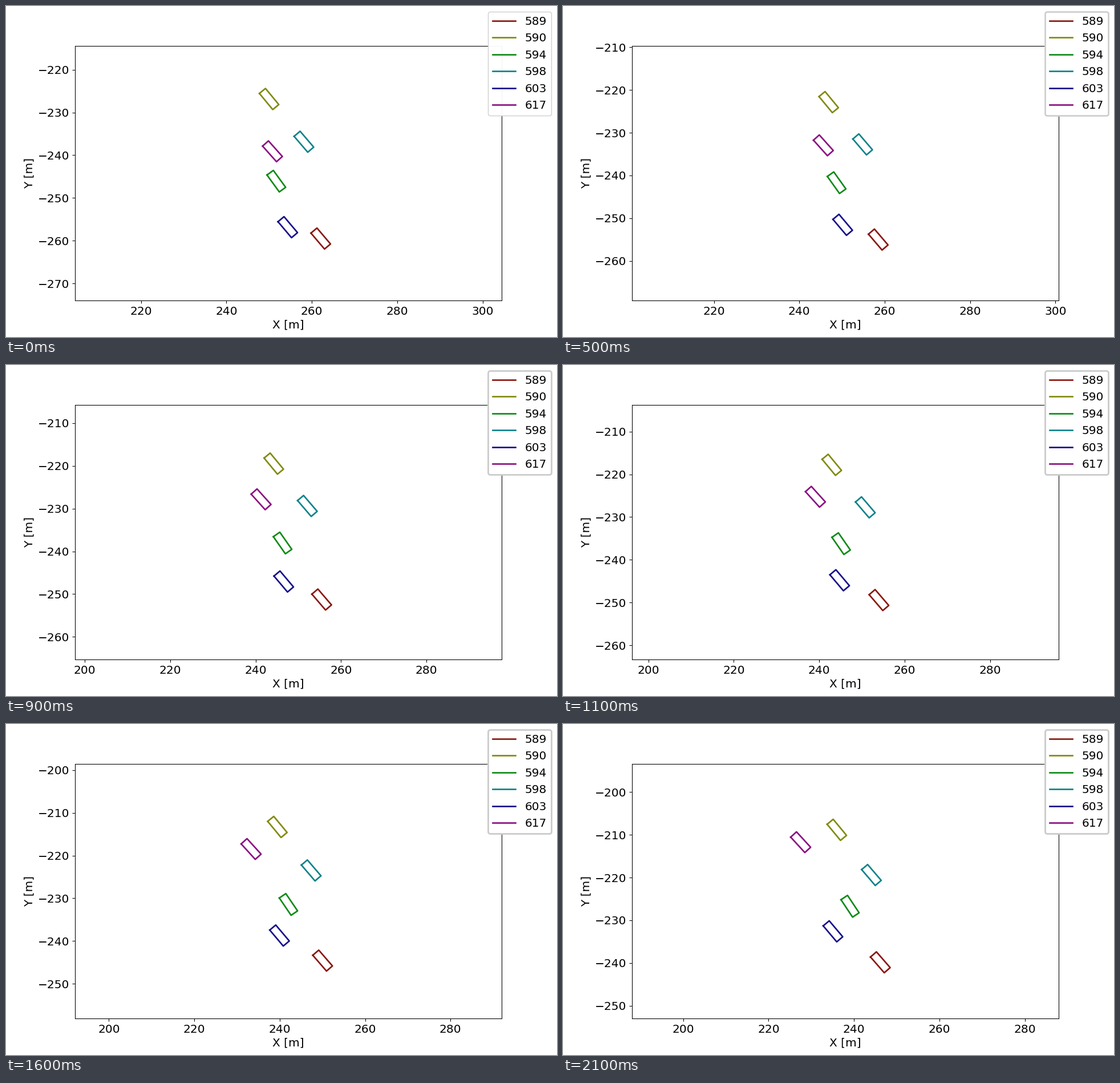
A matplotlib script that plays this animation: 966x580 px, repeating every 2.15 s.

```python
import colorsys

import matplotlib.pyplot as plt
import numpy as np
from matplotlib.animation import FuncAnimation
from matplotlib.ticker import MultipleLocator

FRAMES, INTERVAL = 43, 50
DPI = 96.6
LENGTH, WIDTH = 4.9, 1.84      # vehicle size in metres
HALF_X = 50                    # half of the visible width in metres
DRIFT = 1.7                    # degrees between course and body axis

# The recording starts a little slow and later catches up one step
TICKS = [0, 6, 27, 36, 42]
STEPS = [0, 5.6, 26.6, 36.6, 42.6]

plt.rcParams.update({"font.family": "DejaVu Sans", "font.size": 15})


class Vehicle:
    """Drives a gentle arc to the upper left with constant acceleration."""

    def __init__(self, name, x, y, course, turn, distance, gain):
        self.name, self.x, self.y = name, x, y
        self.course, self.turn = course, turn
        self.distance, self.gain = distance, gain

    def position(self, u):
        run = self.distance * u - self.gain * u * (1 - u)
        chord = np.radians(self.course + self.turn * (u - 1) / 2)
        return self.x - run * np.cos(chord), self.y + run * np.sin(chord)

    def outline(self, u):
        x, y = self.position(u)
        a = np.radians(self.course - DRIFT + self.turn * (u - 0.5))
        along = np.array([-1, -1, 1, 1, -1]) * LENGTH / 2
        across = np.array([-1, 1, 1, -1, -1]) * WIDTH / 2
        return (x + along * np.cos(a) + across * np.sin(a),
                y - along * np.sin(a) + across * np.cos(a))


vehicles = [
    Vehicle(589, 262.10, -259.50, 51.0, -0.7, 25.31, -0.40),
    Vehicle(590, 250.01, -226.84, 52.1, 0.0, 22.83, 0.35),
    Vehicle(594, 251.70, -246.07, 56.9, 2.4, 23.11, -0.46),
    Vehicle(598, 258.16, -236.84, 51.1, 0.0, 22.41, -1.39),
    Vehicle(603, 254.38, -256.84, 51.5, 0.0, 31.00, 1.26),
    Vehicle(617, 250.80, -239.08, 49.6, -0.8, 35.93, 0.45),
]

fig, ax = plt.subplots(figsize=(966 / DPI, 580 / DPI), dpi=DPI)
ax.set_xlabel("X [m]")
ax.set_ylabel("Y [m]")
ax.xaxis.set_major_locator(MultipleLocator(20))
ax.yaxis.set_major_locator(MultipleLocator(10))

box = ax.get_window_extent()
half_y = HALF_X * box.height / box.width

lines = []
for i, vehicle in enumerate(vehicles):
    color = colorsys.hls_to_rgb(0.01 + i / len(vehicles), 0.3, 0.8)
    lines += ax.plot([], [], color=color, lw=2, label=str(vehicle.name))

frame = fig.legend(loc="upper right", labelspacing=0.515).get_frame()


def update(tick):
    u = np.interp(tick, TICKS, STEPS) / STEPS[-1]
    cx, cy = np.mean([v.position(u) for v in vehicles], axis=0)
    ax.set_xlim(cx - HALF_X, cx + HALF_X)
    ax.set_ylim(cy - half_y, cy + half_y)
    for line, vehicle in zip(lines, vehicles):
        line.set_data(*vehicle.outline(u))

    # The legend box grows more solid as if drawn over itself every tick
    frame.set_alpha(1 - 0.2 ** (tick + 2))
    frame.set_linewidth(1 + 1.15 * (1 - 0.84 ** tick))
    return lines


anim = FuncAnimation(fig, update, frames=FRAMES, interval=INTERVAL,
                     init_func=lambda: update(0), repeat=True, repeat_delay=0)
plt.show()
```
